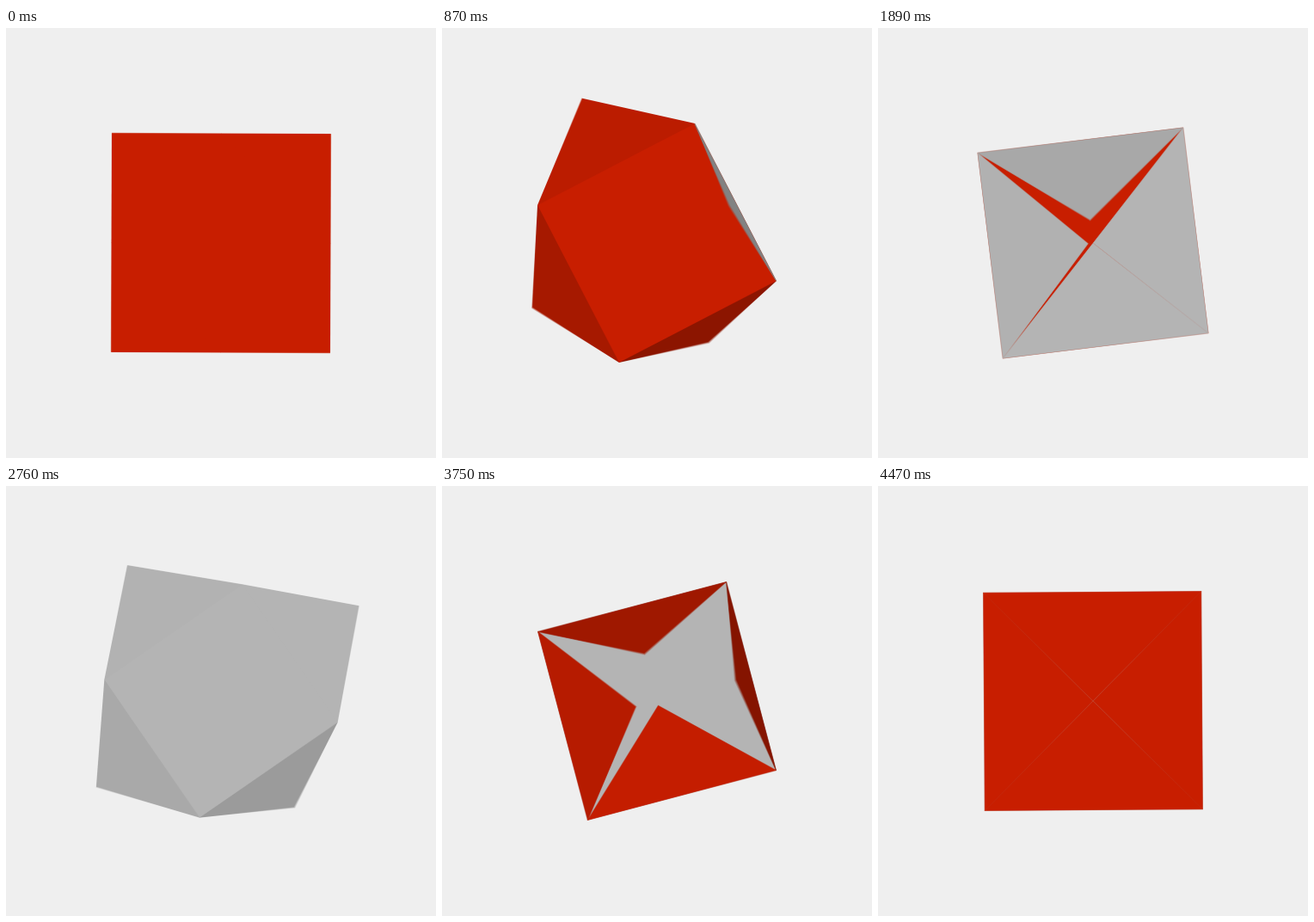
Animation, 500 px wide and 500 px high, one loop 4.5 s. Source, as an HTML page with a canvas:

```html
<!DOCTYPE html>
<html>
<head>
<meta charset="utf-8">
<style>
  html, body { margin: 0; height: 100%; overflow: hidden; background: #efefef; }
  canvas { display: block; }
</style>
</head>
<body>
<canvas id="stage" width="500" height="500"></canvas>
<script>
const ctx = document.getElementById('stage').getContext('2d');
const LOOP = 4500, HALF = LOOP / 2;
const SHUTTER = 18, SAMPLES = 5;
const SIDE = 180;
const SEAM = 0.3; // overlap that hides the joints between folded flaps
const RED = { rgb: [200, 30, 0], ambient: 0.6 };
const GREY = { rgb: [180, 180, 180], ambient: 0.7 };

const clamp01 = x => Math.min(1, Math.max(0, x));

function shade({ rgb, ambient }, facing) {
  const light = ambient + (1 - ambient) * Math.abs(facing);
  return `rgb(${rgb.map(c => Math.round(c * light))})`;
}

function polygon(points, color, edge = 0) {
  ctx.beginPath();
  points.forEach(p => ctx.lineTo(...p));
  ctx.closePath();
  ctx.fillStyle = ctx.strokeStyle = color;
  ctx.fill();
  if (edge) {
    ctx.lineWidth = edge;
    ctx.lineJoin = 'bevel';
    ctx.stroke();
  }
}

// Each flap is a quarter of the sheet, hinged on one side of the base square.
function drawFlap(index, fold, half, front, back) {
  const facing = Math.cos(fold);
  const apex = half + half * facing;
  ctx.save();
  ctx.rotate(index * Math.PI / 2);
  if (facing > 0) {
    const inner = half - 1; // tucked under the base
    polygon([[half, -half], [apex, 0], [half, half], [inner, inner], [inner, -inner]],
      shade(front, facing));
  } else {
    const hinge = half - SEAM;
    polygon([[hinge, -hinge], [apex + SEAM, 0], [hinge, hinge]], shade(back, facing), 2 * SEAM);
  }
  ctx.restore();
}

function drawScene(time) {
  const t = time % LOOP;
  const second = t >= HALF;
  const u = (t % HALF) / HALF;
  const [front, back] = second ? [GREY, RED] : [RED, GREY];
  const half = SIDE / 2 * Math.SQRT2 ** u;
  const folds = [0, 1, 2, 3].map(i => {
    const p = clamp01(1.35 * u - 0.35 * i / 3);
    return Math.PI * p + 0.017 * Math.sin(2 * Math.PI * p);
  });
  const drawFlaps = outside => folds.forEach((fold, i) => {
    if (Math.cos(fold) > 0 === outside) drawFlap(i, fold, half, front, back);
  });

  ctx.fillStyle = '#efefef';
  ctx.fillRect(0, 0, 500, 500);
  ctx.save();
  ctx.translate(250, 250);
  ctx.rotate((u + (second ? 1 : -1)) * Math.PI / 4);
  drawFlaps(true);
  polygon([[-half, -half], [half, -half], [half, half], [-half, half]], shade(front, 1));
  drawFlaps(false);
  ctx.restore();
}

// Average a few moments within the shutter time for motion blur.
const layer = document.createElement('canvas');
layer.width = layer.height = 500;
const blend = layer.getContext('2d');

function frame() {
  const now = performance.now();
  for (let i = 0; i < SAMPLES; i++) {
    drawScene(now + (i + 0.5) * SHUTTER / SAMPLES);
    blend.globalAlpha = 1 / (i + 1);
    blend.drawImage(ctx.canvas, 0, 0);
  }
  ctx.drawImage(layer, 0, 0);
  requestAnimationFrame(frame);
}
frame();
</script>
</body>
</html>
```
